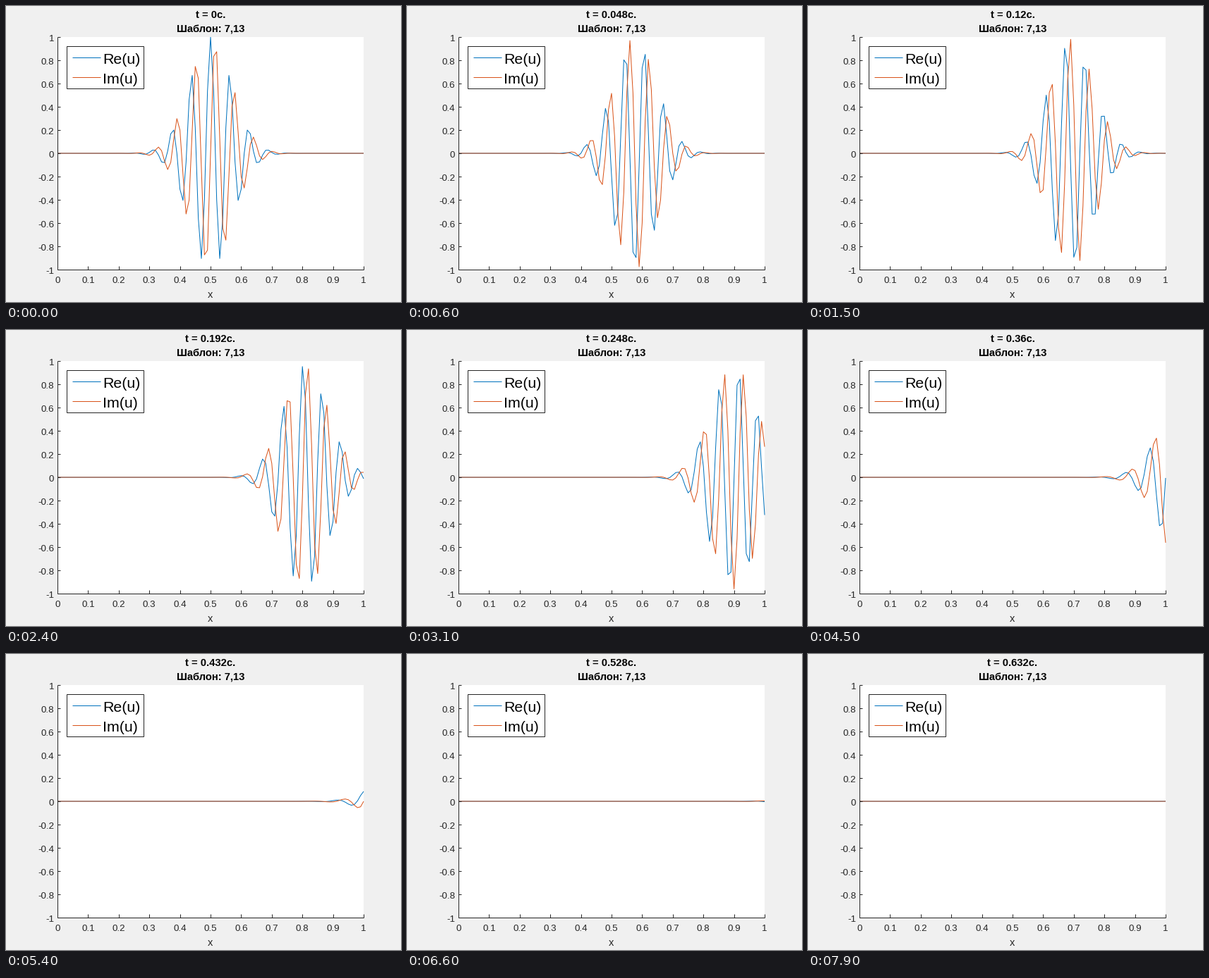
A matplotlib script for the animation above (8000 ms loop, 560x420 px).

```python
import numpy as np
import matplotlib.pyplot as plt
from matplotlib.animation import FuncAnimation
from matplotlib.patches import Rectangle

W, H = 560, 420
FRAMES, INTERVAL = 80, 100
BLUE, ORANGE, GRAY = "#0072BD", "#D95319", "#262626"
LEFT, ZERO, WIDE, HALF = 73, 209, 434, 165

plt.rcParams["font.family"] = "Liberation Sans"

# Crank-Nicolson solution of u_t = i*A*u_xx, worked out in Fourier space
# on a long grid so the packet leaves [0, 1] without reflection.
A, DX, DT, STEPS = 0.01, 0.01, 0.004, 2
N, START = 1000, 300
grid = (np.arange(N) - START) * DX
packet = np.exp(-100 * (grid - 0.5) ** 2 + 100j * (grid - 0.5))
spectrum = np.fft.fft(packet)
theta = 2 * np.pi * np.fft.fftfreq(N)
turn = 2 * np.arctan(2 * A * DT / DX**2 * np.sin(theta / 2) ** 2)


def wave(step):
    u = np.fft.ifft(spectrum * np.exp(-1j * turn * step))
    return u[START:START + 101]


def px(x):
    return LEFT + WIDE * x


def py(v):
    return ZERO - HALF * v


# dpi 72 makes one point equal to one pixel
fig = plt.figure(figsize=(W / 72, H / 72), dpi=72, facecolor="#F0F0F0")
ax = fig.add_axes([0, 0, 1, 1])
ax.set_xlim(0, W)
ax.set_ylim(H, 0)
ax.axis("off")


# straight lines given in whole pixels snap to that pixel's centre
def line(xs, ys, color=GRAY, z=4):
    return ax.plot(xs, ys, color=color, lw=1, zorder=z,
                   solid_capstyle="butt", solid_joinstyle="round")[0]


def label(x, y, s, size, color="black", ha="center", **kw):
    return ax.text(x, y, s, fontsize=size, color=color, ha=ha,
                   va="baseline", zorder=6, **kw)


ax.add_patch(Rectangle((LEFT, 44), WIDE, 330, fc="white", ec="none", zorder=0))

# axes and ticks
line([LEFT, LEFT], [44, 374])
line([LEFT, 507], [374, 374])
for k in range(11):
    x, y = px(k / 10), py(k / 5 - 1)
    line([x, x], [374, 369])
    line([LEFT, 77], [y, y])
    label(x, 393, f"{k / 10:g}", 13.33, GRAY)
    label(68, y + 6, f"{(k - 5) / 5:g}", 13.33, GRAY, "right")
label(290, 414, "x", 14.67, GRAY)

# title
clock = label(290, 17, "", 14.8, weight="bold")
label(290, 37, "Шаблон: 7,13", 14.8, weight="bold")

# curves
re_line = line([], [], BLUE, 2)
im_line = line([], [], ORANGE, 3)
for curve in (re_line, im_line):
    curve.set_clip_path(Rectangle((LEFT, 44), 435, 331, transform=ax.transData))

# legend
ax.add_patch(Rectangle((86, 57), 109, 60, fc="white", ec=GRAY, lw=1, zorder=5))
for y, color, name in ((73, BLUE, "Re(u)"), (101, ORANGE, "Im(u)")):
    line([94, 134], [y, y], color, 6)
    label(137, y + 9, name, 21.33, ha="left")

xs = px(np.arange(101) / 100)


def update(i):
    u = wave(STEPS * i)
    re_line.set_data(xs, py(u.real))
    im_line.set_data(xs, py(u.imag))
    clock.set_text(f"t = {STEPS * DT * i:g}c.")
    return re_line, im_line, clock


anim = FuncAnimation(fig, update, frames=FRAMES, interval=INTERVAL,
                     repeat=True, repeat_delay=0, blit=False)
plt.show()
```
